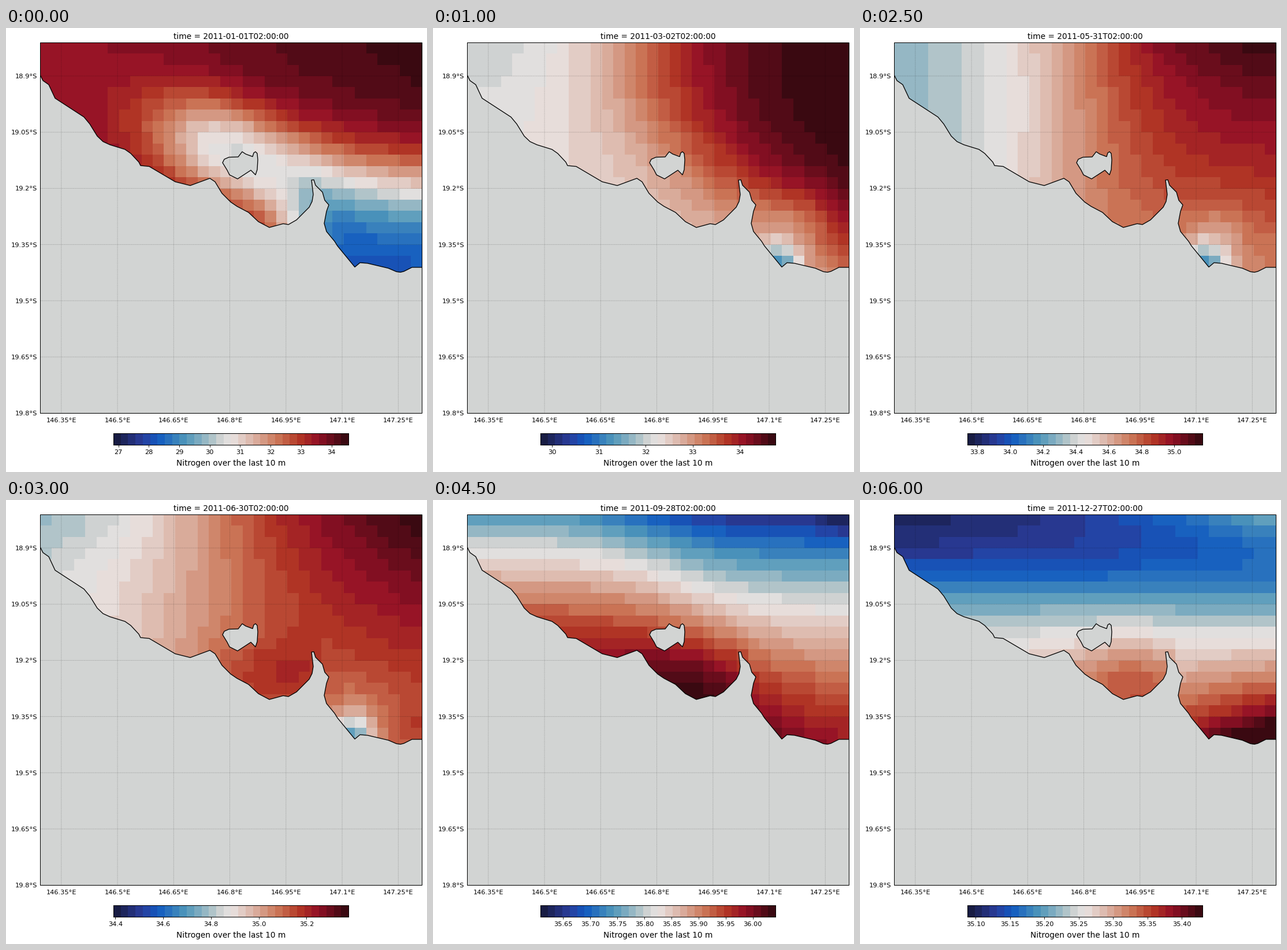
Write a matplotlib script that moves like this. It is 729x768 px and loops after 6.5 s.

```python
import numpy as np
import matplotlib.pyplot as plt
from matplotlib.animation import FuncAnimation
from matplotlib.colors import LinearSegmentedColormap
from matplotlib.patches import Polygon, Rectangle
from matplotlib.ticker import MaxNLocator, ScalarFormatter

W, H, DPI = 729, 768, 100
PT = 72 / DPI  # points per pixel
N_FRAMES, INTERVAL = 13, 500
LEFT, RIGHT, TOP, BOTTOM = 59.5, 720.5, 25.5, 666.5
CELL = 19.45
N_COLS, N_ROWS = 34, 21
LAND = "#d2d4d3"

plt.rcParams["font.family"] = "DejaVu Sans"

CMAP = LinearSegmentedColormap.from_list("sea", [
    (0, "#181c43"), (.11, "#2a3c9b"), (.18, "#115ac0"), (.3, "#4e96ba"),
    (.41, "#a8c0c7"), (.455, LAND), (.5, "#e9e5e4"), (.6, "#dbb2a4"),
    (.7, "#cc795a"), (.8, "#b33725"), (.88, "#931026"), (1, "#3a0911"),
], N=32)

# Water values, in percent of the colour range, over the grid of cells
u, v = np.meshgrid(np.arange(N_COLS), np.arange(N_ROWS))


def step(x, centre, width):
    """Smooth rise from 0 to 1."""
    return (1 + np.tanh((x - centre) / width)) / 2


def blob(cx, cy, rx, ry):
    return np.exp(-((u - cx) / rx) ** 2 - ((v - cy) / ry) ** 2)


bay = blob(20, 14, 6, 3.5) * (u < 25)  # closed off by the cape
plume = blob(27.1, 19.3, 1.9, 1.9)     # river mouth
east = step(u, 22, 3)


def january():
    tongue = blob(17, 9.5 + .3 * (u - 17), 7.5, 4.5)
    return 86 + .4 * u - 46 * tongue - 85 * east * step(v, 12, 5)


def march():
    low = 42 + .8 * v
    front = step(u, 15.5 + .055 * v ** 2, 9)
    return low + (101 - low) * front - 10 * blob(29, 15, 4, 3) - 34 * plume


def may():
    front = step(u, 16 - .02 * v ** 2, 10)
    return 37 + (63 - 1.6 * v) * front - 9 * blob(28, 17, 3, 3) - 34 * plume


def july():
    slope = 45 + 1.65 * u + v * (1.31 - .085 * u)
    return (slope - 6 * blob(5, 0, 7, 3) + 16 * blob(33, 19, 3.5, 3)
            + 19 * bay - 40 * plume)


def september():
    rise = 34 + 5.6 * v - .1 * v ** 2
    return (rise - 23 * step(u, 15 + .6 * v, 6) - 8 * blob(34, 0, 3, 1.5)
            + 8 * bay)


def november():
    front = step(u, 12.5 + 1.15 * v, 4.5 + .25 * v)
    return (74 - (72 - 2.9 * v) * front + 18 * blob(7, 1.5, 3.5, 2.5)
            + 22 * bay)


def december():
    corners = .025 * u ** 2 * ((v - 8) / 8) ** 2
    return 3 + 52 * step(v, 6.5, 4.5) + corners + 14 * bay


# Step in the loop, field, ends of the colour range
KEYS = [
    (0, january, 26.84, 34.56), (2, march, 29.755, 34.765),
    (5, may, 33.741, 35.172), (7, july, 35.043, 35.579),
    (9, september, 35.608, 36.042), (11, november, 35.463, 35.844),
    (12, december, 35.088, 35.430),
]
STEPS, MAKERS, LOWS, HIGHS = zip(*KEYS)
FIELDS = [make() for make in MAKERS]

COAST = [
    (50, 65), (59, 81), (64, 91), (74, 98), (85, 121.5), (135, 154),
    (145, 166), (158, 187), (168, 196.5), (180, 202), (206, 210), (216, 217),
    (230, 232), (233, 238), (248, 239.5), (293, 266), (319, 272.5),
    (353, 260), (362, 266), (374, 286), (389, 301), (400, 308.5), (420, 319),
    (437, 335), (456, 345), (480, 338.5), (489, 340), (503, 332), (525, 310),
    (530, 300), (532, 288), (529, 263), (533, 262.5), (536, 272), (548, 284),
    (552, 298), (559, 306), (555, 317), (551, 338), (555, 352), (569, 369),
    (574, 377), (604, 413.5), (613, 406), (626, 407), (662, 415.5),
    (676, 421.5), (683, 422.5), (689, 421), (703, 414), (740, 414),
    (740, 690), (50, 690),
]
ISLAND = [
    (375, 233), (378, 227), (386, 223.5), (402, 223), (409, 214), (415, 218),
    (427, 222.5), (429, 216), (432, 214), (435, 217), (436, 228), (435, 245),
    (432, 254), (424, 246), (401, 261), (387, 254), (383, 246),
]

fig = plt.figure(figsize=(W / DPI, H / DPI), dpi=DPI, facecolor="white")
ax = fig.add_axes([0, 0, 1, 1])
ax.set_xlim(0, W)
ax.set_ylim(H, 0)
ax.axis("off")


def label(x, y, text, size, ha="center"):
    return ax.text(x, y, text, fontsize=size * PT, ha=ha, va="baseline")


x_edges = LEFT + CELL * np.arange(N_COLS + 1)
y_edges = 83 + CELL * (np.arange(N_ROWS + 1) - 3)
x_edges[-1], y_edges[0] = RIGHT, TOP
mesh = ax.pcolormesh(x_edges, y_edges, FIELDS[0] / 100, cmap=CMAP,
                     vmin=0, vmax=1, zorder=1)

frame_box = Rectangle((LEFT, TOP), RIGHT - LEFT, BOTTOM - TOP, fill=False,
                      ec="black", lw=PT, snap=False, zorder=5)
ax.add_patch(frame_box)
for outline in (COAST, ISLAND):
    land = Polygon(outline, closed=True, fc=LAND, ec="black", lw=1.3 * PT,
                   joinstyle="round", zorder=2)
    ax.add_patch(land)
    land.set_clip_path(frame_box)

for k in range(7):
    x, y = 95.8 + 97.25 * k, 83 + 97.2 * k
    style = dict(color="black", alpha=.2, lw=.9 * PT, ls=(0, (2, 1)),
                 snap=False, zorder=3)
    ax.plot([x, x], [TOP, BOTTOM], **style)
    ax.plot([LEFT, RIGHT], [y, y], **style)
    label(x, 682, f"{146.35 + .15 * k:.6g}°E", 11.33)
    label(54, y + 4, f"{18.9 + .15 * k:.6g}°S", 11.33, "right")

title = label(390, 19, "", 13.6)
label(390, 757, "Nitrogen over the last 10 m", 13.6)

# Colour bar
cax = fig.add_axes([186.1 / W, 1 - 721 / H, 407 / W, 19.9 / H])
bar = cax.imshow(np.linspace(0, 1, 32)[None, :], cmap=CMAP, aspect="auto",
                 interpolation="nearest", extent=(0, 1, 0, 1))
cax.set_yticks([])
cax.xaxis.set_major_locator(MaxNLocator(9, steps=[1, 2, 2.5, 5, 10]))
cax.xaxis.set_major_formatter(ScalarFormatter(useOffset=False))
cax.tick_params(axis="x", length=4 * PT, width=.9 * PT, pad=4 * PT,
                labelsize=11.33 * PT)
for spine in cax.spines.values():
    spine.set_linewidth(PT)


def update(i):
    j = min(np.searchsorted(STEPS, i, side="right") - 1, len(STEPS) - 2)
    t = (i - STEPS[j]) / (STEPS[j + 1] - STEPS[j])
    field = FIELDS[j] * (1 - t) + FIELDS[j + 1] * t
    mesh.set_array(np.clip(field / 100, 0, 1))
    low, high = np.interp(i, STEPS, LOWS), np.interp(i, STEPS, HIGHS)
    bar.set_extent((low, high, 0, 1))
    cax.set_xlim(low, high)
    day = np.datetime64("2011-01-01") + 30 * int(i)
    title.set_text(f"time = {day}T02:00:00")
    return mesh, bar, title


anim = FuncAnimation(fig, update, frames=N_FRAMES, interval=INTERVAL,
                     repeat=True, repeat_delay=0, blit=False)
plt.show()
```
